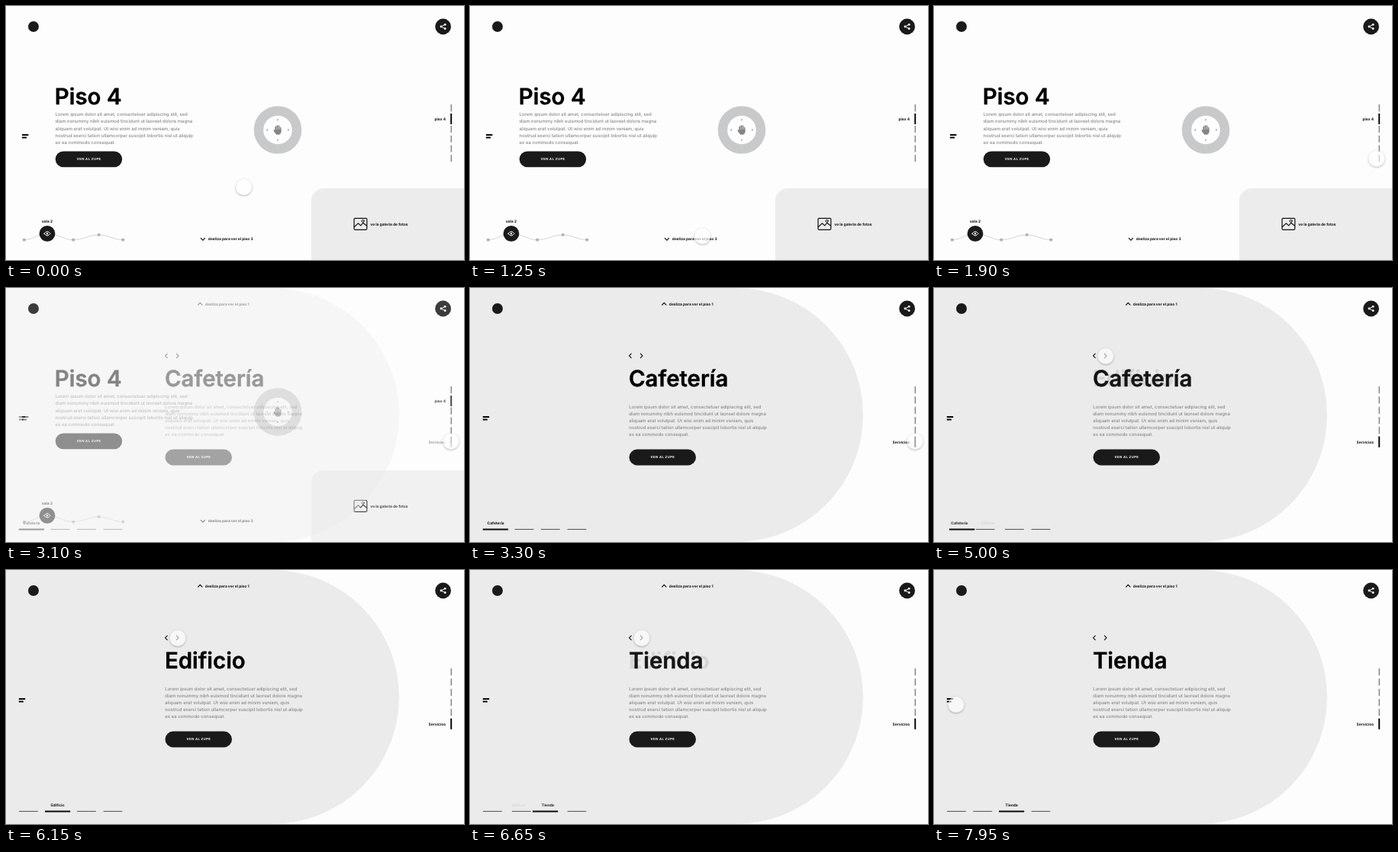
An HTML page that plays this animation: 600x333 px, repeating every 8000 ms.

```html
<!DOCTYPE html>
<html lang="es">
<head>
<meta charset="utf-8">
<title>Piso 4</title>
<style>
  html, body { margin: 0; width: 100%; height: 100%; overflow: hidden; background: #fdfdfd; }
  svg { position: absolute; left: 0; top: 0; width: 600px; height: 333px; }
  text {
    font-family: Inter, "Liberation Sans", sans-serif;
    font-optical-sizing: none;
    text-rendering: geometricPrecision;
    fill: #0c0c0c;
  }
  .title, .title text { font-size: 29.4px; font-weight: 600; fill: #000; stroke: #000; stroke-width: .4px; }
  .copy { font-size: 5.97px; font-weight: 500; fill: #878787; }
  .label { font-size: 4.9px; font-weight: 700; }
  .cta { font-size: 4.2px; font-weight: 700; letter-spacing: .4px; fill: #fff; }
  .mid { text-anchor: middle; }
  .end { text-anchor: end; }
  .dark { fill: #1a1a1a; }
  .line { fill: none; stroke: #111; stroke-width: 1.2; stroke-linecap: round; stroke-linejoin: round; }
  .white { stroke: #fff; stroke-width: 1; }
  .thin { stroke: #505050; stroke-width: 1; }
  .thick { stroke: #0a0a0a; stroke-width: 2; }
  #cursor {
    position: absolute; left: -10.5px; top: -10.5px; width: 21px; height: 21px;
    border-radius: 50%; background: rgba(255, 255, 255, .62);
    box-shadow: 0 .8px 2.6px rgba(0, 0, 0, .36);
  }
</style>
</head>
<body>
<svg viewBox="0 0 600 333">
  <defs>
    <g id="frame">
      <circle class="dark" cx="36" cy="27" r="7"/>
      <circle class="dark" cx="572.6" cy="27" r="10.4"/>
      <path class="line white" d="M575 24.4 570 27l5 2.6"/>
      <g fill="#fff">
        <circle cx="575.2" cy="24.3" r="1.4"/>
        <circle cx="570" cy="27" r="1.4"/>
        <circle cx="575.2" cy="29.7" r="1.4"/>
      </g>
    </g>
    <path id="menu" class="thick" d="M0 169h8.4M0 172.6h6"/>
    <g id="button">
      <rect class="dark" width="87.5" height="20.8" rx="10.4"/>
      <text class="cta mid" x="43.9" y="11.9">VEN AL ZUPE</text>
    </g>
  </defs>

  <g id="floor">
    <use href="#frame"/>
    <use href="#menu" x="21"/>
    <text class="title" x="63.8" y="129.2">Piso 4</text>
    <text class="copy" data-x="64.6" data-y="144.2"></text>
    <use href="#button" x="64.7" y="190.4"/>

    <circle cx="356" cy="162.5" r="31.3" fill="#c8c9ca"/>
    <circle cx="356" cy="162.5" r="18.8" fill="#fff"/>
    <path fill="#777" d="M341 162.5l1.8-1.2v2.4zM371 162.5l-1.8-1.2v2.4zM356 148l-1.2 1.8h2.4zM356 177l-1.2-1.8h2.4z"/>
    <g fill="none" stroke="#858585" stroke-width="1.7" stroke-linecap="round">
      <path d="M353.2 164v-5.4M355.3 163v-6.2M357.5 163v-5.8M359.6 164v-4.4M351.4 163l2.2 3"/>
    </g>
    <path fill="#858585" d="M352.4 162h8.1v2.6c0 2.5-1.4 4.2-3.9 4.2-2.2 0-3.3-.9-4.4-2.6l-1.3-2.3z"/>

    <path class="thin" d="M583.2 129v9.2M583.2 157v9M583.2 169.8v9M583.2 182.5v9M583.2 195.2v9"/>
    <path class="thick" d="M583.2 141v14"/>
    <text class="label end" x="576" y="149.7">piso 4</text>

    <path fill="#ececec" d="M400 333V255a16 16 0 0 1 16-16H600V333z"/>
    <rect class="line" x="456" y="278.3" width="16.8" height="15" rx="1.2"/>
    <path class="line" d="M456.4 289.5l5-4.6 3.2 3 3.2-3.6 4.8 4"/>
    <circle class="line" cx="467.6" cy="281.9" r="1.5" style="stroke-width:1"/>
    <text class="label" x="477.3" y="287.6">ve la galeria de fotos</text>

    <path fill="none" stroke="#d4d4d4" stroke-width="1"
      d="M24 306.6C36 306.6 42 298 54 298S76 306.6 88 306.6 109 300 121.5 300 141 306.6 153 306.6"/>
    <g fill="#b3b3b3">
      <circle cx="23.8" cy="306.6" r="2.1"/>
      <circle cx="88.2" cy="306.6" r="2.1"/>
      <circle cx="121.7" cy="300" r="2.1"/>
      <circle cx="153.2" cy="306.6" r="2.1"/>
    </g>
    <circle class="dark" cx="54" cy="298.4" r="10.4"/>
    <path class="line white" d="M50 298.4q4-5.6 8 0q-4 5.6-8 0z"/>
    <circle cx="54" cy="298.4" r="1.2" fill="#fff"/>
    <text class="label mid" x="54" y="283.8">sala 2</text>

    <path class="line" d="M255.2 304.4l2.7 2.7 2.7-2.7"/>
    <text class="label" x="264.8" y="307.4">desliza para ver el piso 3</text>
  </g>

  <g id="services">
    <path fill="#ebebeb" d="M0 0H348.5a166.5 166.5 0 0 1 0 333H0z"/>
    <use href="#frame"/>
    <use href="#menu" x="16.8"/>
    <path class="line" d="M251.6 22.2l2.7-2.7 2.7 2.7"/>
    <text class="label" x="260.8" y="22.6">desliza para ver el piso 1</text>
    <path class="line" d="M211.2 86.2l-2.6 2.7 2.6 2.7M223.4 86.2l2.6 2.7-2.6 2.7"/>

    <g class="title">
      <text id="t0" x="207.9" y="129.2">Cafetería</text>
      <text id="t1" x="207.9" y="129.2">Edificio</text>
      <text id="t2" x="207.9" y="129.2">Tienda</text>
    </g>
    <text class="copy" data-x="208.3" data-y="157.5"></text>
    <use href="#button" x="208.5" y="211.6"/>

    <path class="thin" d="M583.2 129v9.2M583.2 142.3v9.2M583.2 155.8v9.2M583.2 169v9.2M583.2 182v9.2"/>
    <path class="thick" d="M583.2 194.6v14.2"/>
    <text class="label end" x="576" y="203.7">Servicios</text>

    <path id="bar" class="thick" d="M0 316.4h33.2"/>
    <path id="tab1" class="thin" d="M0 316.4h24.8"/>
    <path id="tab2" class="thin" d="M0 316.4h24.8"/>
    <path class="thin" d="M127.6 316.4h24.8"/>
    <g class="label mid">
      <text id="l0" y="310">Cafetería</text>
      <text id="l1" y="310">Edificio</text>
      <text id="l2" y="310">Tienda</text>
    </g>
  </g>
</svg>
<div id="cursor"></div>

<script>
const LOOP = 8000;
const $ = id => document.getElementById(id);

const copy = [
  'Lorem ipsum dolor sit amet, consectetuer adipiscing elit, sed',
  'diam nonummy nibh euismod tincidunt ut laoreet dolore magna',
  'aliquam erat volutpat. Ut wisi enim ad minim veniam, quis',
  'nostrud exerci tation ullamcorper suscipit lobortis nisl ut aliquip',
  'ex ea commodo consequat.'
];
document.querySelectorAll('.copy').forEach(el => {
  const { x, y } = el.dataset;
  el.innerHTML = copy.map((s, i) => `<tspan x="${x}" y="${+y + i * 9.2}">${s}</tspan>`).join('');
});

// rows: [ms, value, easing towards the next row]
function play(id, prop, rows, format = v => v) {
  const steps = [[0, rows[0][1]], ...rows, [LOOP, rows[rows.length - 1][1]]];
  $(id).animate(
    steps.map(([t, v, easing = 'linear']) => ({ offset: t / LOOP, [prop]: format(v), easing })),
    { duration: LOOP, iterations: Infinity }
  );
}
const fade = (id, rows) => play(id, 'opacity', rows);
const slide = (id, rows) => play(id, 'transform', rows, x => `translateX(${x}px)`);

const S = 'ease-in-out';
const open = [2945, 3300], first = [4920, 5300], second = [6350, 6730];
const tween = ([a, b], from, to, easing = S) => [[a, from, easing], [b, to]];

fade('floor', tween(open, 1, 0, 'ease-in'));
fade('services', tween(open, 0, 1));

for (const k of ['t', 'l']) {
  fade(k + 0, tween(first, 1, 0));
  fade(k + 1, [...tween(first, 0, 1), ...tween(second, 1, 0)]);
  fade(k + 2, tween(second, 0, 1));
}

slide('bar', [...tween(first, 16.8, 51), ...tween(second, 51, 85)]);
slide('tab1', tween(first, 58.6, 17));
slide('tab2', tween(second, 93, 51.2));
slide('l0', tween(first, 33.6, 29.4));
slide('l1', [...tween(first, 71.2, 67.6), ...tween(second, 67.6, 63.4)]);
slide('l2', tween(second, 105.4, 101.6));

play('cursor', 'transform', [
  [175, [311, 237], S], [800, [299, 303]],
  [1225, [299, 303], 'ease'], [2050, [585, 197.5]],
  [2075, [585, 197.5], S], [2300, [582.5, 200.5]],
  [2525, [582.5, 200.5], S], [2660, [582.5, 200.5, .9], S], [2800, [582.5, 200.5]],
  [3610, [582.5, 200.5], 'ease-in'], [3680, [556, 208]], [3800, [370, 188], 'ease-out'], [3900, [255, 167.5]],
  [4050, [255, 167.5]], [4100, [248.3, 148.3], 'ease-out'], [4850, [224.4, 88.8]],
  [6725, [224.4, 88.8], S], [7150, [287, 31]],
  [7175, [287, 28], S], [7500, [-15, 173]],
  [7610, [-15, 190], 'ease-out'], [7950, [28.5, 176]]
], ([x, y, s = 1]) => `translate(${x}px, ${y}px) scale(${s})`);
</script>
</body>
</html>
```
